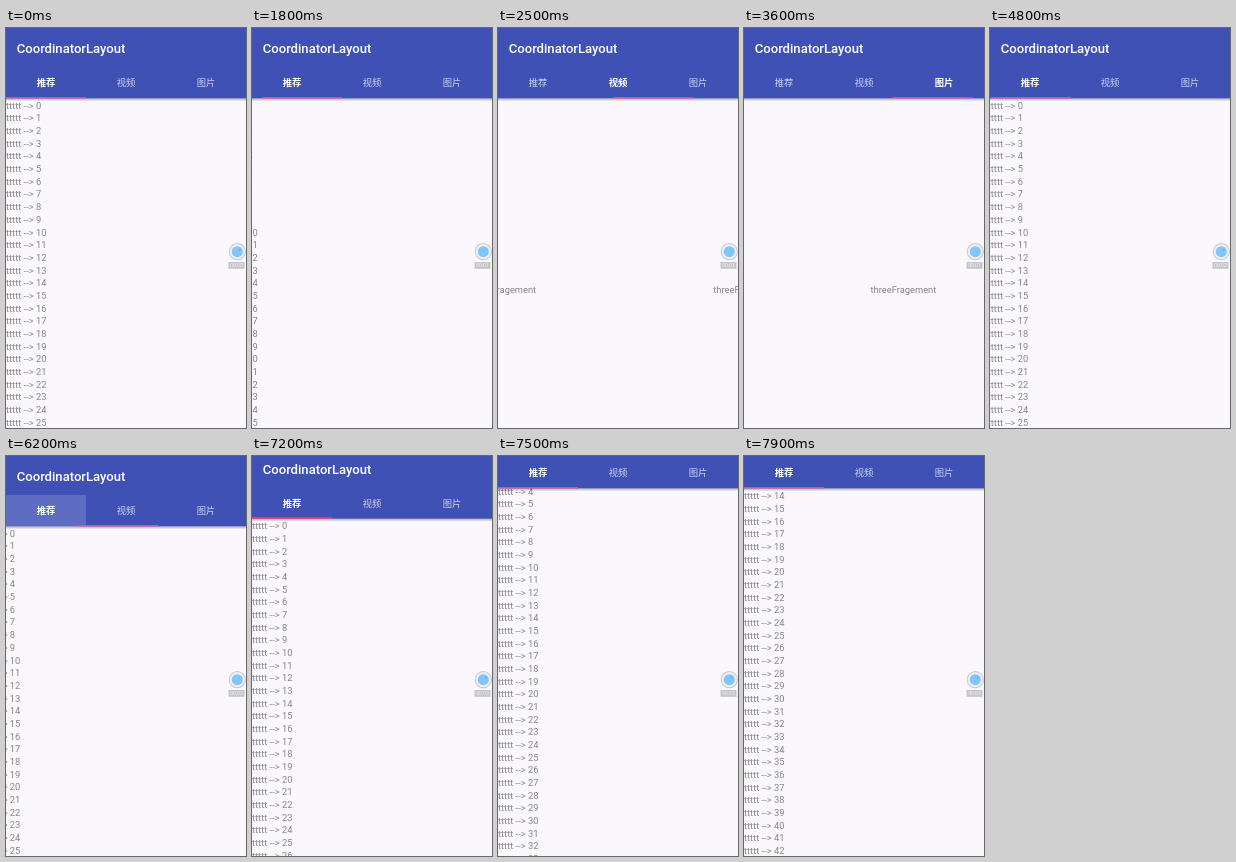
An HTML page with a canvas that plays this animation: 240x400 px, repeating every 8000 ms.

```html
<!DOCTYPE html>
<html lang="zh">
<head>
<meta charset="utf-8">
<style>
html, body { margin: 0; width: 240px; height: 400px; overflow: hidden; background: #faf8fc; }
canvas { display: block; }
</style>
</head>
<body>
<canvas id="stage" width="240" height="400"></canvas>
<script>
const ctx = document.getElementById('stage').getContext('2d');
const LOOP = 8000, STEP = 100, WIDTH = 240, TAB = 80;
const TOOLBAR = 38, BAR = 70.4, ROW = 12.67;
const LATIN = 'Roboto, sans-serif';
const CJK = '"Noto Sans CJK SC", "Noto Sans CJK", sans-serif';
const TABS = ['推荐', '视频', '图片'];

const move = (start, duration, by) => ({ start, duration, by });
const SWIPES = [
  move(1700, 635, 1), move(2300, 600, 1),
  move(3500, 590, -1), move(4300, 600, -1), move(5200, 400, 1)
];
// Tapping the first tab moves the page at once; its indicator follows more slowly.
const TAP_PAGE = move(6100, 159, -1);
const TAP_INDICATOR = move(6150, 400, -1);
const SCROLL = move(7100, 900, 222.6);
const INDICATOR_LAG = 8;
const TICK_FLIPS = [500, 2700, 3200, 4400, 5300, 6800];

// Smoothstep; a skew above 1 starts quickly and settles slowly.
function progress({ start, duration, by }, t, skew = 1.6) {
  const x = Math.min(1, Math.max(0, (t - start) / duration));
  const u = 1 - (1 - x) ** skew;
  return by * u * u * (3 - 2 * u);
}

const swiped = t => SWIPES.reduce((sum, swipe) => sum + progress(swipe, t), 0);

function rect(x, y, w, h, color) {
  ctx.fillStyle = color;
  ctx.fillRect(x, y, w, h);
}

function disc(x, y, r, color) {
  ctx.fillStyle = color;
  ctx.beginPath();
  ctx.arc(x, y, r, 0, 2 * Math.PI);
  ctx.fill();
}

function text(str, x, y, font, color, align = 'left') {
  ctx.font = font;
  ctx.fillStyle = color;
  ctx.textAlign = align;
  ctx.fillText(str, x, y);
}

function drawPages(page, scroll) {
  const body = `9.33px ${LATIN}`, gray = '#858487';
  for (let i = 0; i < 48; i++) {
    text(`ttttt --> ${i}`, -page * WIDTH, 80.8 + i * ROW - scroll, body, gray);
  }
  ['twoFragement', 'threeFragement'].forEach((name, i) =>
    text(name, 120 + (i + 1 - page) * WIDTH, 264.5, body, gray, 'center'));
}

function drawBar(top, indicator, selected, ripple) {
  ctx.save();
  ctx.translate(0, top);
  const shadow = ctx.createLinearGradient(0, BAR, 0, BAR + 3);
  shadow.addColorStop(0, 'rgba(0,0,0,.3)');
  shadow.addColorStop(1, 'rgba(0,0,0,0)');
  rect(0, BAR, WIDTH, 3, shadow);
  rect(0, 0, WIDTH, BAR, '#3f51b5');
  text('CoordinatorLayout', 10.67, 25.2, `500 13.1px ${LATIN}`, '#fff');
  rect(0, 39, TAB, BAR - 39, `rgba(255,255,255,${ripple})`);
  TABS.forEach((label, i) => {
    const on = i === selected;
    text(label, TAB * (i + .5), 58.4, `${on ? 700 : 500} 9.33px ${CJK}`,
      on ? '#fff' : 'rgba(255,255,255,.75)', 'center');
  });
  rect(indicator * TAB, BAR - 1.4, TAB, 1.4, '#ff4081');
  ctx.restore();
}

function drawRecorder(t) {
  disc(231.3, 223.7, 8.6, '#c8c8cc');
  disc(231.3, 223.7, 7.6, '#eeeef2');
  disc(231.3, 223.7, 5.5, '#82c5fa');
  const ticking = TICK_FLIPS.filter(time => time <= t).length % 2 === 0;
  if (ticking) disc(233.7, 221.6, .9, '#a092b4');
  rect(222.5, 234, 16, 6.8, '#c6c5c9');
  const seconds = Math.floor((t + 2000) / 3000);
  text(`00:0${seconds}`, 230.5, 239.3, `5px ${LATIN}`, '#f2f2f4', 'center');
}

function draw(now) {
  const t = Math.floor(now % LOOP / STEP) * STEP;
  const page = swiped(t) + progress(TAP_PAGE, t);
  const indicator = swiped(t - INDICATOR_LAG) + progress(TAP_INDICATOR, t);
  const scroll = progress(SCROLL, t, 1);
  const ripple = t < 6200 ? 0 : .16 * Math.max(0, 1 - (t - 6200) / 300);
  rect(0, 0, WIDTH, 400, '#faf8fc');
  drawPages(page, scroll);
  drawBar(-Math.min(scroll, TOOLBAR), indicator, Math.round(page), ripple);
  drawRecorder(t);
}

const start = performance.now();
function frame() {
  draw(performance.now() - start);
  requestAnimationFrame(frame);
}
frame();
</script>
</body>
</html>
```
